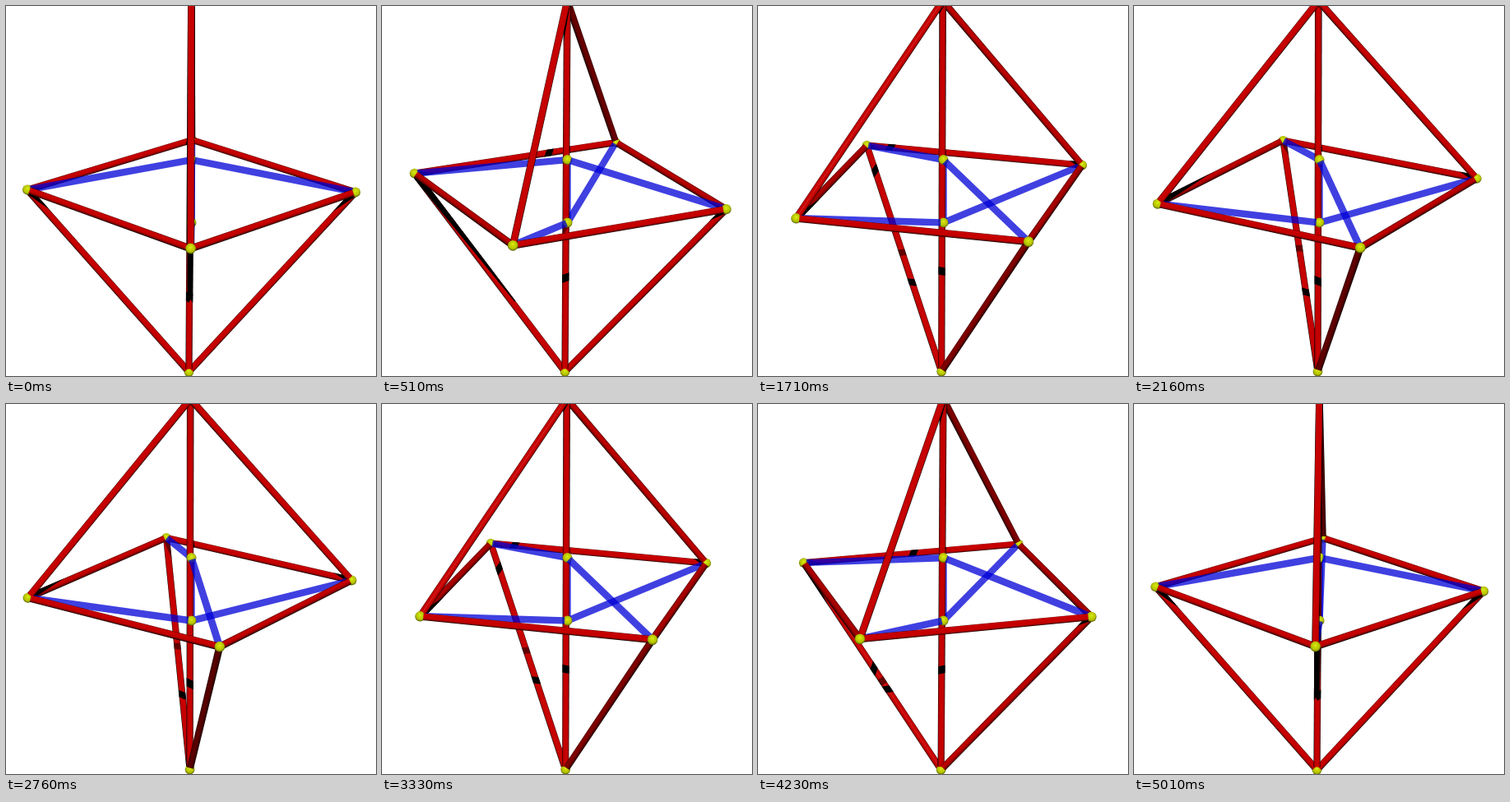
Write an HTML page with a canvas that moves like this. It is 450 by 450 pixels and loops after 5.04 s.

```html
<!DOCTYPE html>
<html lang="en">
<head>
<meta charset="utf-8">
<title>Rotating wire polyhedron</title>
<style>
html, body { margin: 0; width: 100%; height: 100%; overflow: hidden; background: #fff; }
canvas { display: block; width: 450px; height: 450px; }
</style>
</head>
<body>
<canvas id="stage" width="450" height="450"></canvas>
<script>
const ctx = document.getElementById('stage').getContext('2d');
const LOOP = 5040, STEP = 30, DEGREE = Math.PI / 180;
const START = 0.25 * DEGREE, SWING = 88.9 * DEGREE;
const RADIUS = 199.5, DISTANCE = 3107, CX = 225.5, CY = 225;
const TUBE = 4.2, BALL = 6;

const fromElevation = a => [0, Math.sin(a), Math.cos(a)];
const CAM = 0.3359, SUN = Math.atan(0.71);
const VIEW = fromElevation(CAM), LIGHT = fromElevation(SUN), HALF = fromElevation((CAM + SUN) / 2);

const dot = (a, b) => a.reduce((sum, v, i) => sum + v * b[i], 0);
const sub = (a, b) => a.map((v, i) => v - b[i]);
const scale = (a, k) => a.map(v => v * k);
const unit = a => scale(a, 1 / (Math.hypot(...a) || 1));
const mix = (a, b, t) => a.map((v, i) => v + (b[i] - v) * t);
const cross = (a, b) => [a[1] * b[2] - a[2] * b[1], a[2] * b[0] - a[0] * b[2], a[0] * b[1] - a[1] * b[0]];
const perp = ([x, y]) => [-y, x];

const RED_EDGES = ['AB', 'BC', 'CD', 'DA', 'TA', 'TC', 'GB', 'GD', 'TG'];
const BLUE_EDGES = ['EB', 'ED', 'FA', 'FC', 'EF'];

// The body leans slightly towards D.
function vertices(angle) {
  const at = (turns, r, y, shift = 0) => {
    const a = angle + turns * 2 * Math.PI;
    return [shift - r * Math.sin(a), y, r * Math.cos(a)];
  };
  return {
    A: at(0, RADIUS, 0), B: at(0.25, RADIUS, 1.2),
    C: at(0.5, RADIUS, 0), D: at(0.75, RADIUS, -1.2),
    E: [0, 40, 0], F: [0, -41, 0],
    T: at(0.75, 1.4, 239, -1.5), G: at(0.25, 1.4, -239, -1.7)
  };
}

function project(p) {
  const s = DISTANCE / (DISTANCE - dot(p, VIEW));
  const up = p[1] * Math.cos(CAM) - p[2] * Math.sin(CAM);
  return { xy: [CX + p[0] * s, CY - up * s], s };
}

// Position on the plane facing the light, y pointing down.
const lightPlane = p => [p[0], p[2] * Math.sin(SUN) - p[1] * Math.cos(SUN)];

function fillPath(points, style) {
  ctx.beginPath();
  points.forEach(p => ctx.lineTo(...p));
  ctx.closePath();
  ctx.fillStyle = style;
  ctx.fill();
}

function redGradient(dir, mid, normal, width) {
  const side = unit(cross(dir, VIEW)), front = cross(side, dir);
  const gradient = ctx.createLinearGradient(
    mid[0] - normal[0] * width, mid[1] - normal[1] * width,
    mid[0] + normal[0] * width, mid[1] + normal[1] * width);
  for (let i = 0; i <= 12; i++) {
    const n = i / 6 - 1, f = Math.sqrt(1 - n * n);
    const surface = side.map((v, k) => v * n + front[k] * f);
    const lit = Math.min(198, 250 * Math.max(0, dot(surface, LIGHT)) ** 0.8);
    const shine = 100 * Math.max(0, dot(surface, HALF)) ** 200;
    gradient.addColorStop(i / 12, `rgb(${lit + shine * 0.4},${shine},${shine})`);
  }
  return gradient;
}

function shadowFalls(receiver, caster, pts, P, Q) {
  const depth = name => dot(pts[name], LIGHT);
  const shared = [...receiver].find(c => caster.includes(c));
  const dP = sub(P[1], P[0]), dQ = sub(Q[1], Q[0]);
  if (shared) {
    const ray = edge => {
      const far = edge[0] === shared ? edge[1] : edge[0];
      const d = sub(lightPlane(pts[far]), lightPlane(pts[shared]));
      return { dir: unit(d), slope: (depth(far) - depth(shared)) / Math.hypot(...d) };
    };
    const r = ray(receiver), c = ray(caster);
    return dot(r.dir, c.dir) > 0.8 && c.slope > r.slope;
  }
  const det = dot(perp(dP), dQ);
  if (Math.abs(det) < 1e-6) return false;
  const gap = sub(Q[0], P[0]);
  const u = dot(perp(gap), dQ) / det, v = dot(perp(gap), dP) / det;
  if (u < 0 || u > 1 || v < -0.02 || v > 1.02) return false;
  const along = (edge, t) => depth(edge[0]) * (1 - t) + depth(edge[1]) * t;
  return along(caster, v) > along(receiver, u) + 5;
}

function drawShadows(edge, pts, normal) {
  const plane = e => [...e].map(c => lightPlane(pts[c]));
  const P = plane(edge), dP = sub(P[1], P[0]), length = Math.hypot(...dP);
  const e = unit(dP), n = perp(e);
  for (const caster of [...RED_EDGES, ...BLUE_EDGES]) {
    if (caster === edge || caster === 'EF') continue;
    const Q = plane(caster);
    if (!shadowFalls(edge, caster, pts, P, Q)) continue;
    const m = scale(perp(unit(sub(Q[1], Q[0]))), TUBE);
    const corners = [[0, 1], [1, 1], [1, -1], [0, -1]].map(([end, sign]) => {
      const rel = sub(sub(Q[end], P[0]), scale(m, sign)), off = dot(rel, n);
      const base = project(mix(pts[edge[0]], pts[edge[1]], dot(rel, e) / length)).xy;
      return [base[0] + normal[0] * off, base[1] + normal[1] * off];
    });
    fillPath(corners, BLUE_EDGES.includes(caster) ? 'rgba(0,0,0,.5)' : '#000');
  }
}

function drawTube(edge, pts, blue) {
  const p = pts[edge[0]], q = pts[edge[1]];
  const dir = unit(sub(q, p)), trim = scale(dir, 4);
  const a = project(p), b = project(q);
  const from = project(sub(p, scale(trim, -1))), to = project(sub(q, trim));
  const normal = perp(unit(sub(b.xy, a.xy)));
  const rim = (end, sign) => end.xy.map((v, i) => v + normal[i] * sign * TUBE * end.s);
  const outline = [rim(from, 1), rim(to, 1), rim(to, -1), rim(from, -1)];
  if (blue) return fillPath(outline, 'rgba(0,0,215,.75)');
  const width = TUBE * (a.s + b.s) / 2;
  fillPath(outline, redGradient(dir, mix(a.xy, b.xy, 0.5), normal, width));
  ctx.save();
  ctx.clip();
  drawShadows(edge, pts, normal);
  ctx.restore();
}

function drawBall(p) {
  const { xy: [x, y], s } = project(p), r = BALL * s;
  const gradient = ctx.createRadialGradient(x, y - r * 0.28, 0, x, y - r * 0.1, r * 1.1);
  gradient.addColorStop(0, '#dcec30');
  gradient.addColorStop(0.25, '#ccdc00');
  gradient.addColorStop(0.7, '#b4c200');
  gradient.addColorStop(1, '#565c00');
  ctx.beginPath();
  ctx.arc(x, y, r, 0, 2 * Math.PI);
  ctx.fillStyle = gradient;
  ctx.fill();
}

function draw(time) {
  const t = Math.floor(time % LOOP / STEP) * STEP;
  const phase = 1 - Math.abs(1 - 2 * t / LOOP);
  const pts = vertices(START + SWING * phase);
  const tube = (edge, blue) => ({
    depth: dot(mix(pts[edge[0]], pts[edge[1]], 0.5), VIEW),
    paint: () => drawTube(edge, pts, blue)
  });
  // E and F bulge out of the axis rod, so they sort just in front of it.
  const ball = name => ({
    depth: 'EF'.includes(name) ? 2 : dot(pts[name], VIEW),
    paint: () => drawBall(pts[name])
  });
  const items = [
    ...RED_EDGES.map(e => tube(e, false)),
    ...BLUE_EDGES.map(e => tube(e, true)),
    ...[...'ABCDEFG'].map(ball)
  ];
  ctx.fillStyle = '#fff';
  ctx.fillRect(0, 0, 450, 450);
  items.sort((a, b) => a.depth - b.depth).forEach(item => item.paint());
}

const begin = performance.now();
function tick() {
  draw(performance.now() - begin);
  requestAnimationFrame(tick);
}
tick();
</script>
</body>
</html>
```
